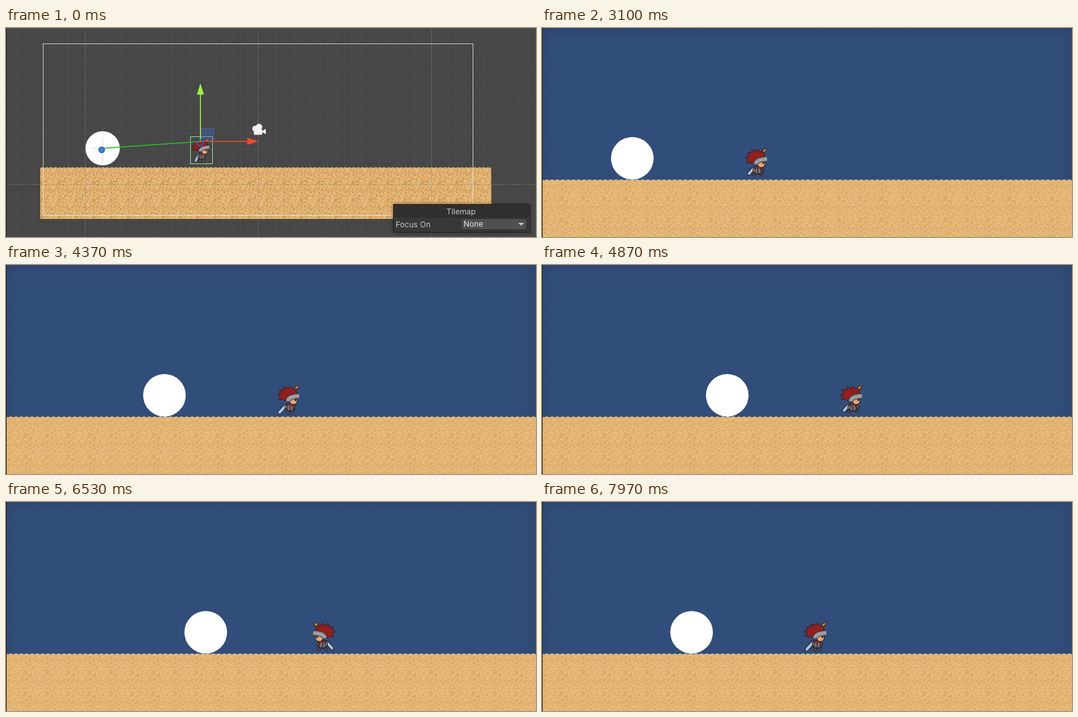
Recreate the animation shown at these times as an HTML page with a canvas. Size 820 px wide and 324 px high, loop 8010 ms.

```html
<!DOCTYPE html>
<html lang="en">
<head>
<meta charset="utf-8">
<title>Ball and hero</title>
<style>
  html, body { margin: 0; width: 100%; height: 100%; overflow: hidden; background: #474747; }
  canvas { display: block; }
</style>
</head>
<body>
<canvas id="stage" width="820" height="324"></canvas>
<script>
const W = 820, H = 324, LOOP = 8010, PLAY = 1870, LAST = 7970;
const UNIT = 33, CELL = 26.77, ZOOM = CELL / UNIT;
const FALL = 2280, RUN = 2790, TURN = 5850, BACK = 7720;
const SPEED = 0.083, START_X = 114;
const INK = '#24161a', STEEL = '#8f9094', RED = '#91201e';
const ctx = document.getElementById('stage').getContext('2d');

function makeLayer(w, h, draw) {
  const c = document.createElement('canvas');
  c.width = w;
  c.height = h;
  draw(c.getContext('2d'));
  return c;
}

function seeded(seed) {
  return () => (seed = (seed * 16807) % 2147483647) / 2147483647;
}

function disc(g, x, y, r, fill) {
  g.beginPath();
  g.arc(x, y, r, 0, Math.PI * 2);
  g.fillStyle = fill;
  g.fill();
}

function box(g, x, y, w, h, r, fill) {
  g.beginPath();
  g.roundRect(x, y, w, h, r);
  g.fillStyle = fill;
  g.fill();
}

function frameBox(g, x, y, w, h, color) {
  g.strokeStyle = color;
  g.lineWidth = 1;
  g.strokeRect(x + 0.5, y + 0.5, w, h);
}

function line(g, x1, y1, x2, y2, color, width = 1) {
  g.beginPath();
  g.moveTo(x1, y1);
  g.lineTo(x2, y2);
  g.strokeStyle = color;
  g.lineWidth = width;
  g.stroke();
}

// Isosceles triangle: tip, direction, length, half base
function wedge(g, x, y, angle, len, half, fill) {
  g.save();
  g.translate(x, y);
  g.rotate(angle);
  g.beginPath();
  g.moveTo(0, 0);
  g.lineTo(-len, half);
  g.lineTo(-len, -half);
  g.fillStyle = fill;
  g.fill();
  g.restore();
}

// Sand

function sandTile(count, dark, light) {
  return makeLayer(UNIT, UNIT, g => {
    const rnd = seeded(4711);
    g.fillStyle = '#e4b574';
    g.fillRect(0, 0, UNIT, UNIT);
    for (let i = 0; i < count; i++) {
      g.fillStyle = i % 2 ? dark : light;
      const x = Math.floor(rnd() * UNIT), y = Math.floor(rnd() * UNIT);
      g.fillRect(x, y, 1 + rnd(), 1);
    }
  });
}

function ground(g, x, y, w, h, scale, tile) {
  g.save();
  g.translate(x, y);
  g.scale(scale, scale);
  const gw = w / scale, gh = h / scale;
  const top = new Path2D();
  for (let i = 0; i <= gw; i++) {
    top.lineTo(i, 1.8 - 1.6 * Math.abs(Math.sin(i * Math.PI * 4 / UNIT)));
  }
  const area = new Path2D(top);
  area.lineTo(gw, gh);
  area.lineTo(0, gh);
  g.fillStyle = g.createPattern(tile, 'repeat');
  g.fill(area);
  g.strokeStyle = 'rgba(244,214,160,.6)';
  g.stroke(top);
  g.restore();
}

// Hero: about 35 by 48, facing right

function limb(g, x, y, angle, len, color, width) {
  const x2 = x + Math.cos(angle) * len, y2 = y + Math.sin(angle) * len;
  line(g, x, y, x2, y2, INK, width + 1.8);
  line(g, x, y, x2, y2, color, width);
}

function hair(g) {
  const spikes = 6, from = 2.5, to = 5.75;
  g.beginPath();
  for (let k = 0; k <= spikes * 2; k++) {
    const tip = k % 2, a = from + (to - from) * k / (spikes * 2) - tip * 0.12;
    const r = tip ? 1 : 0.74;
    g.lineTo(18 + 18 * r * Math.cos(a), 16 + 14.5 * r * Math.sin(a));
  }
  g.lineTo(32, 15);
  g.lineTo(14, 25);
  g.closePath();
  g.fillStyle = RED;
  g.fill();
  g.strokeStyle = INK;
  g.lineWidth = 0.8;
  g.stroke();
}

function visor(g, color, width) {
  g.beginPath();
  g.moveTo(16.5, 25);
  g.quadraticCurveTo(17, 18, 34, 17);
  g.strokeStyle = color;
  g.lineWidth = width;
  g.stroke();
}

function head(g) {
  disc(g, 25, 24.5, 6.2, INK);
  disc(g, 25, 24.5, 5.3, '#e5a877');
  g.fillStyle = INK;
  g.fillRect(27, 22, 2, 3);
  hair(g);
  limb(g, 29, 5, -0.8, 3, '#d98525', 3);
  g.lineCap = 'butt';
  visor(g, INK, 8.4);
  visor(g, STEEL, 6.8);
  visor(g, '#a6a7aa', 2);
  g.lineCap = 'round';
}

// stride: 0 feet together, 1 feet apart
function hero(g, running, stride, x, y, sx = 1, sy = 1) {
  const hip = running ? 38 : 41, down = Math.PI / 2, spread = 0.15 + stride * 0.75;
  g.save();
  g.translate(x, y);
  g.scale(sx, sy);
  g.lineCap = g.lineJoin = 'round';
  limb(g, 13, 32, running ? 2.3 : 2, running ? 14 - stride * 4 : 12, '#a8c7e4', 4);
  limb(g, 17, hip, down + spread, 5, '#625a60', 2.6);
  limb(g, 22, hip, down - spread, 5, '#625a60', 2.6);
  box(g, 13, 28, 14, 13, 4, INK);
  box(g, 14, 29, 12, 11, 3, '#4c464e');
  for (const dx of [0, 5]) line(g, 17 + dx, 33, 17.5 + dx, 38, STEEL, 1.6);
  line(g, 17, 30.5, 25, 30.5, '#9c2724', 2);
  limb(g, 14, 33, down, 2 + stride, '#77757a', 3);
  limb(g, 26, 33, down - stride, 3, '#7c5142', 2.4);
  head(g);
  g.restore();
}

// Editor view

function grid(g) {
  const color = i => i % 10 ? '#4e4e4e' : '#626262';
  for (let i = -14; i <= 16; i++) {
    const x = Math.round(390 + i * CELL) + 0.5;
    line(g, x, 0, x, H, color(i));
  }
  for (let i = -9; i <= 3; i++) {
    const y = Math.round(242 + i * CELL) + 0.5;
    line(g, 0, y, W, y, color(i));
  }
}

function arrow(g, angle, color) {
  g.save();
  g.translate(300.8, 175.7);
  g.rotate(angle);
  line(g, 0, 0, 73, 0, color, 1.6);
  wedge(g, 90, 0, 0, 17.5, 5.5, color);
  g.restore();
}

function cameraIcon(g, color) {
  disc(g, 385.5, 156, 4.5, color);
  disc(g, 391.5, 153.5, 5, color);
  box(g, 383.5, 157, 13, 8.5, 1, color);
  wedge(g, 395, 160.5, Math.PI, 7, 4.2, color);
}

function gizmos(g) {
  disc(g, 149.5, 186.5, 26.5, '#fff');
  line(g, 149.5, 170, 149.5, 210, '#c5e6c5');
  line(g, 133, 186.5, 168, 186.5, '#c5e6c5');
  hero(g, false, 0, 287, 171, ZOOM, ZOOM);
  frameBox(g, 285, 168, 34, 42, '#8fdd8f');
  line(g, 149, 186.5, 301, 176, '#25c425', 1.3);
  disc(g, 148, 189, 5, '#1e4f91');
  disc(g, 148, 189, 3.8, '#3c83dc');
  box(g, 301, 155, 21, 21, 0, 'rgba(68,98,180,.42)');
  frameBox(g, 301, 155, 20, 20, '#4563a6');
  arrow(g, -Math.PI / 2, '#9bef48');
  arrow(g, 0, '#ef4a2b');
  g.beginPath();
  g.arc(300, 178, 4.8, 0, Math.PI * 2);
  g.strokeStyle = '#315fae';
  g.lineWidth = 2;
  g.stroke();
  cameraIcon(g, '#f2f2f2');
}

function panel(g) {
  g.save();
  g.shadowColor = 'rgba(0,0,0,.55)';
  g.shadowBlur = 5;
  box(g, 599, 273, 211, 44, 3, '#383838');
  g.restore();
  box(g, 599, 273, 211, 21, 3, '#302f2d');
  frameBox(g, 599, 273, 211, 43, '#232323');
  box(g, 704, 295, 102, 18, 3, '#303030');
  box(g, 705, 296, 100, 16, 2, '#505050');
  g.font = '12px Inter, Roboto, sans-serif';
  g.fillStyle = '#c6c6c6';
  g.textAlign = 'center';
  g.fillText('Tilemap', 704, 289);
  g.textAlign = 'left';
  g.fillText('Focus On', 603, 309);
  g.fillStyle = '#e2e2e2';
  g.fillText('None', 708, 308);
  wedge(g, 797, 306.5, Math.PI / 2, 4.5, 4.5, '#c4c4c4');
}

function leftEdge(g) {
  g.fillStyle = '#191919';
  g.fillRect(0, 0, 1, H);
}

const editor = makeLayer(W, H, g => {
  g.fillStyle = '#474747';
  g.fillRect(0, 0, W, H);
  grid(g);
  ground(g, 53, 216, 698, 80, ZOOM, sandTile(500, '#bd8a47', '#efc88c'));
  for (let i = -1; i <= 1; i++) {
    const x = Math.round(390 + i * 10 * CELL) + 0.5;
    line(g, x, 217, x, 296, 'rgba(130,130,130,.35)');
  }
  line(g, 53, 242.5, 751, 242.5, 'rgba(130,130,130,.35)');
  frameBox(g, 57, 24, 665, 266, 'rgba(235,235,235,.8)');
  gizmos(g);
  panel(g);
  leftEdge(g);
});

// Game view

function shade(g, x1, y1, x2, y2) {
  const s = g.createLinearGradient(x1, y1, x2, y2);
  s.addColorStop(0, 'rgba(20,30,50,.1)');
  s.addColorStop(1, 'rgba(20,30,50,0)');
  g.fillStyle = s;
  g.fillRect(0, 0, W, 236);
}

const field = makeLayer(W, H, g => {
  g.fillStyle = '#314d79';
  g.fillRect(0, 0, W, H);
  shade(g, 0, 0, 0, 18);
  shade(g, 0, 0, 18, 0);
  shade(g, W, 0, W - 18, 0);
  ground(g, -5, 235, 830, 95, 1, sandTile(400, '#d3a15d', '#edc488'));
  leftEdge(g);
});

// Time spent between a and b
const span = (t, a, b) => Math.max(0, Math.min(t, b) - a);

function ballX(t) {
  const forward = span(t, RUN, TURN - 50) + span(t, BACK + 15, LAST);
  return START_X + SPEED * (forward - span(t, TURN + 20, BACK - 20));
}

function drawGame(t) {
  const s = span(t, FALL, LAST) / 1000, drop = 161 * s * s;
  const x = ballX(t);
  ctx.drawImage(field, 0, 0);
  disc(ctx, x, 199.5 + Math.min(2.5, drop), 33, '#fff');
  if (t < RUN) {
    hero(ctx, false, 0, x + 169, 178 + Math.min(7.5, drop));
    return;
  }
  const stride = Math.abs(Math.sin((t - 2770) * Math.PI / 200));
  const left = t >= TURN && t < BACK;
  hero(ctx, true, stride, x + (left ? 200.5 : 174.5), 186, left ? -1 : 1);
}

// Game steps come three per 100 ms
function stepTime(t) {
  const r = (t + 30) % 100;
  return Math.min(LAST, t - r + 30 * Math.min(2, Math.floor(r / 30)));
}

const start = performance.now();

function frame() {
  const t = (performance.now() - start) % LOOP;
  if (t < PLAY) ctx.drawImage(editor, 0, 0);
  else drawGame(Math.max(PLAY, stepTime(t)));
  requestAnimationFrame(frame);
}
frame();
</script>
</body>
</html>
```
